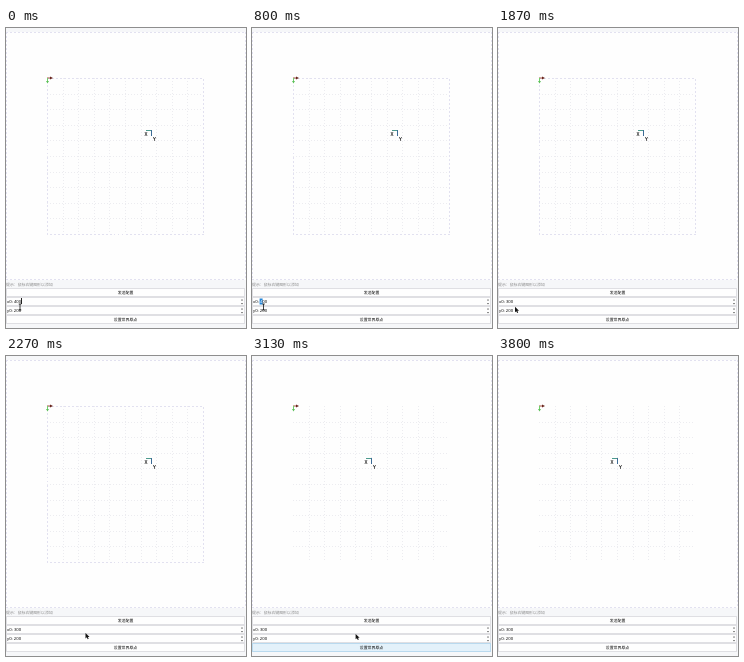
Animation, 240 px wide and 300 px high, one loop 3870 ms. Source, as an HTML page:

```html
<!DOCTYPE html>
<html lang="zh">
<head>
<meta charset="utf-8">
<style>
  html, body { margin: 0; width: 100%; height: 100%; overflow: hidden; background: #fefefe; }
  svg { display: block; width: 240px; height: 300px; }
  text { font-family: "Open Sans", "Noto Sans CJK SC", "Noto Sans CJK", sans-serif; font-size: 4.25px; font-weight: 500; fill: #000; }
  .cjk { font-family: "Noto Sans CJK SC", "Noto Sans CJK", sans-serif; font-size: 3.9px; }
  .mid { text-anchor: middle; }
  .hint { fill: #8c8c8c; }
  .axis { font-size: 4.8px; font-weight: 600; }
  .crisp { shape-rendering: crispEdges; fill: none; }
  .grid { stroke: #ececf0; stroke-dasharray: 1 2; }
  .edge { stroke: #e2e1f0; stroke-dasharray: 2 2; }
  .box { fill: #fefefe; stroke: #dfdfe3; shape-rendering: crispEdges; }
</style>
</head>
<body>
<svg viewBox="0 0 240 300">
  <rect width="240" height="300" fill="#f6f7f9"/>
  <rect y="4" width="240" height="248" fill="#fefefe"/>
  <path class="crisp edge" d="M0 4.5H240M0 251.5H240M.5 4V252M239.5 4V252"/>

  <path id="grid" class="crisp grid"/>
  <rect id="outline" class="crisp edge" x="41.5" y="50.5" width="156" height="156"/>

  <path d="M41 50H45" stroke="#a35340" fill="none"/>
  <path d="M44 48.5L47 50L44 51.5Z" fill="#68251e"/>
  <path class="crisp" d="M41.5 50V54" stroke="#6fd06a"/>
  <path d="M40 53H43L41.5 55.5Z" fill="#5cc058"/>

  <g id="marker">
    <path class="crisp" d="M140 102.5H146" stroke="#4d9a8e"/>
    <path class="crisp" d="M145.5 102V108" stroke="#3d6c96"/>
    <text class="axis" x="138.5" y="108">X</text>
    <text class="axis" x="147" y="113">Y</text>
  </g>

  <text class="cjk hint" x="0" y="257.6">提示：鼠标右键图形以添加</text>
  <g id="boxes"></g>
  <rect id="selection" x="7.6" y="270.5" width="3" height="6" fill="#2385d8"/>
  <text class="cjk mid" x="119.5" y="266">发送配置</text>
  <text x="1" y="275.3">x0: <tspan id="digit"></tspan>00</text>
  <text x="1" y="284">y0: 200</text>
  <path id="caret" class="crisp" d="M15.5 270V276" stroke="#222"/>
  <text class="cjk mid" x="119.5" y="292.8">设置世界原点</text>
  <path id="spinners" fill="#555"/>

  <path id="beam" d="M-1.3 -3H1.3M0 -3V3M-1.3 3H1.3" stroke="#111" stroke-width=".8" fill="none"/>
  <path id="arrow" d="M0 0V5.4L1.3 4.3L2.2 6.2L3.2 5.7L2.3 3.9H4Z" fill="#111"/>
</svg>
<script>
const LOOP = 3870, STEP = 200 / 3;
const $ = id => document.getElementById(id);
const show = (id, on) => $(id).style.display = on ? '' : 'none';

let lines = '';
for (let i = 1; i < 10; i++) {
  const p = Math.round(i * 15.6) + .5;
  lines += `M${41 + p} 50V206M41 ${50 + p}H197`;
}
$('grid').setAttribute('d', lines);

$('boxes').innerHTML = [260.5, 269.5, 278.5, 287.5].map((y, i) =>
  `<rect id="box${i}" class="box" x=".5" y="${y}" width="238" height="8"/>`).join('');
$('spinners').setAttribute('d', [271, 280].map(y =>
  `M235 ${y + 1.5}l1-1.5 1 1.5zM235 ${y + 4}l1 1.5 1-1.5z`).join(''));

// time, x, y
const track = [
  [0, 14, 279], [470, 14, 279], [730, 11.5, 279], [1200, 11.5, 279],
  [1400, 12, 279], [1800, 12, 279], [2200, 79.5, 277], [2400, 79.5, 277],
  [2730, 89, 290], [3000, 89, 290], [3330, 227, 176], [3600, 227, 176],
  [3800, 250, 140]
];

function pointerAt(t) {
  const i = track.findIndex(k => k[0] > t);
  if (i < 0) return track[track.length - 1].slice(1);
  const a = track[i - 1], b = track[i];
  const u = (t - a[0]) / (b[0] - a[0]);
  const e = u * u * (3 - 2 * u);
  return [a[1] + (b[1] - a[1]) * e, a[2] + (b[2] - a[2]) * e];
}

function render(now) {
  const t = Math.floor((now % LOOP + 1) / STEP) * STEP;
  const [x, y] = pointerAt(t);
  const typing = t < 1850, moved = t >= 3000;
  const hover = t >= 2670 && t < 3660;
  const selected = t >= 660 && t < 1650;

  for (const id of ['beam', 'arrow']) $(id).setAttribute('transform', `translate(${x} ${y})`);
  show('beam', typing);
  show('arrow', !typing && t < 3790);
  show('selection', selected);
  show('caret', t < 530);
  show('outline', !moved);
  $('digit').textContent = t < 1650 ? '4' : '3';
  $('digit').style.fill = selected ? '#fff' : '';
  $('marker').setAttribute('transform', `translate(${moved ? -26 : 0} 0)`);
  $('box3').style.fill = hover ? '#e3f1fa' : '';
  $('box3').style.stroke = hover ? '#b9d9ee' : '';
}

function loop() {
  render(performance.now());
  requestAnimationFrame(loop);
}
loop();
</script>
</body>
</html>
```
